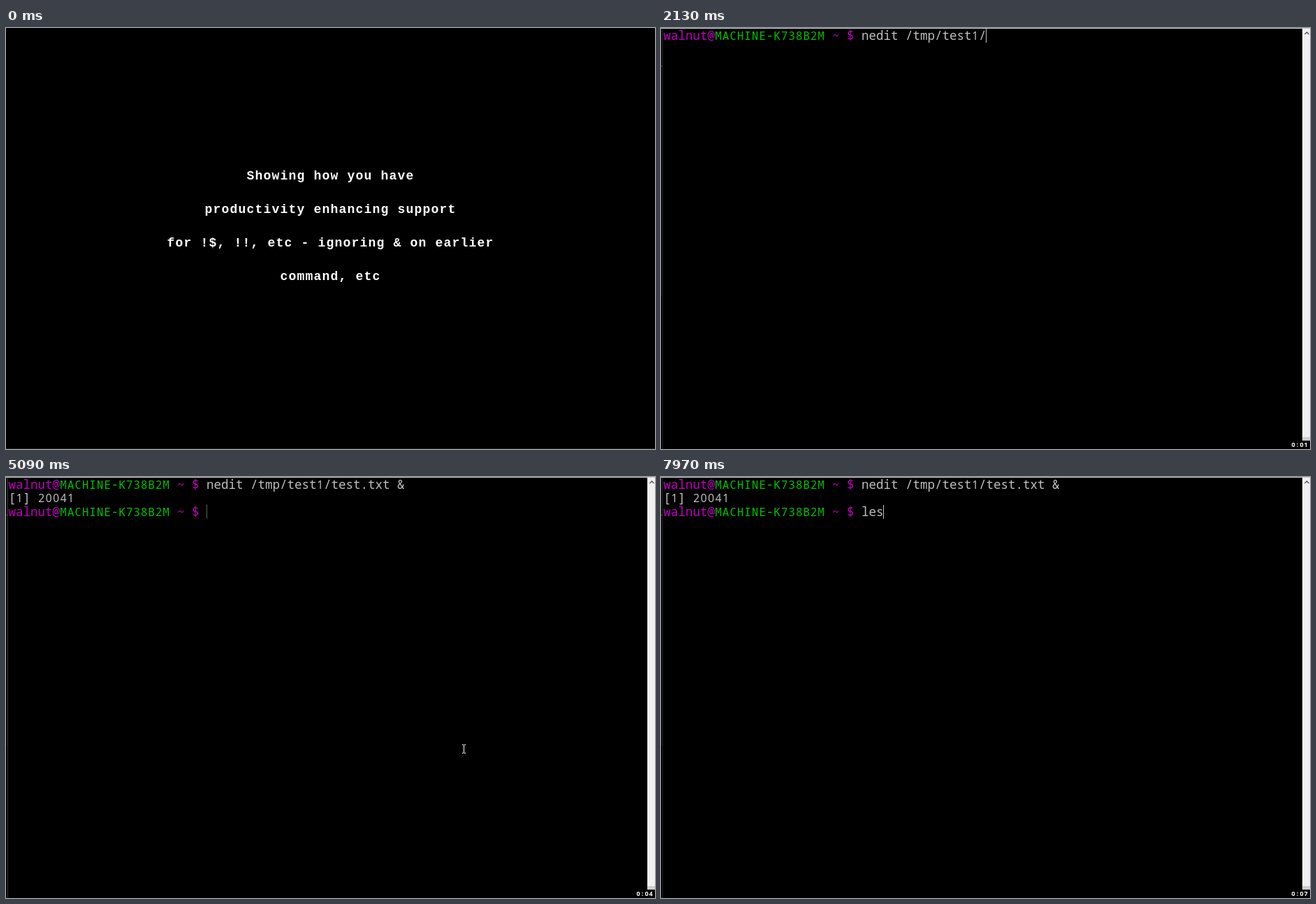
Animation, 929 px wide and 603 px high, one loop 8000 ms. Source, as an HTML page with a canvas:

```html
<!DOCTYPE html>
<html>
<head>
<meta charset="utf-8">
<style>
html, body { margin: 0; width: 100%; height: 100%; overflow: hidden; background: #000; }
canvas { display: block; }
</style>
</head>
<body>
<canvas id="stage" width="929" height="603"></canvas>
<script>
const ctx = document.getElementById('stage').getContext('2d');
const LOOP = 8000, CELL = 10.5, LEFT = 3.5;
const MAGENTA = '#bf00bf', GREEN = '#00bf00', GREY = '#bfbfbf';
const TITLE = [
  'Showing how you have',
  'productivity enhancing support',
  'for !$, !!, etc - ignoring & on earlier',
  'command, etc'
];
const USER = 'walnut@', HOST = 'MACHINE-K738B2M', PROMPT_LENGTH = 27;

// Each entry: time and the text typed at that time
const FIRST = [[500, 'nedit /t'], [620, 'm'], [770, 'p'], [890, '/'], [1040, 't'],
  [1170, 'e'], [1320, 's'], [1470, 't'], [1980, '1'], [2130, '/'],
  [2280, 'test.txt '], [3270, '&']];
const SECOND = [[7690, 'l'], [7840, 'e'], [7970, 's']];
const TICKS = [1570, 2560, 3550, 4530, 5520, 6510, 7560];
const ENTER = 3830, BLUR = 4100, FOCUS = 6080;

const within = (t, from, to) => t >= from && t < to;
const typed = (keys, t) => keys.filter(k => k[0] <= t).map(k => k[1]).join('');

function rect(x, y, w, h, color) {
  ctx.fillStyle = color;
  ctx.fillRect(x, y, w, h);
}

// Monospaced text, each glyph centred in its cell
function cells(text, x, y, step, color, fontOf) {
  ctx.fillStyle = color;
  ctx.textAlign = 'center';
  [...text].forEach((c, i) => {
    ctx.font = fontOf(c);
    ctx.fillText(c, x + (i + 0.5) * step, y);
  });
}

const titleFont = () => 'bold 18px "Liberation Mono", monospace';
const timerFont = () => 'bold 9px "Noto Sans", sans-serif';

// Low capitals and plain digits next to tall lowercase letters
function shellFont(c) {
  if (/[A-Z]/.test(c)) return '15.4px "DejaVu Sans Mono", monospace';
  if (/[0-9]/.test(c)) return '15.6px "Noto Sans", sans-serif';
  return '17.5px "Noto Sans Mono", monospace';
}

function shell(text, col, row, color) {
  cells(text, LEFT + col * CELL, 17 + Math.floor(row * 19.5), CELL, color, shellFont);
}

function promptLine(row, command) {
  shell(USER, 0, row, MAGENTA);
  shell(HOST, USER.length, row, GREEN);
  shell('~ $', 23, row, MAGENTA);
  shell(command, PROMPT_LENGTH, row, GREY);
}

function caret(col, y, dotted) {
  const x = Math.floor(LEFT + col * CELL);
  if (!dotted) return rect(x, y, 1, 20, GREY);
  for (let i = 0; i < 20; i += 2) rect(x, y + i, 1, 1, GREY);
}

function pointer(x, y) {
  for (const end of [y, y + 12]) {
    rect(x, end, 2, 1, '#fff');
    rect(x + 3, end, 2, 1, '#fff');
  }
  rect(x + 2, y + 1, 1, 11, '#fff');
}

function drawTitle() {
  TITLE.forEach((line, i) =>
    cells(line, 464 - line.length * 6, 217 + i * 48, 12, '#fff', titleFont));
  rect(0, 602, 929, 1, '#1c1c1c');
}

function drawFrame(t) {
  const blurred = within(t, BLUR, FOCUS);
  rect(0, 0, 929, 1, '#c8c8c8');
  rect(0, 1, 2, 383, '#0c0c0c');
  rect(0, 54, 2, 1, '#444');
  rect(2, 1, 1, 602, blurred ? '#333' : '#222');
  rect(918, 1, 11, 585, '#f0f0f0');
  rect(918, 586, 11, 5, '#cdcdcd');
  ctx.strokeStyle = '#505050';
  ctx.lineWidth = 1.4;
  ctx.beginPath();
  ctx.moveTo(921.5, 9);
  ctx.lineTo(924.5, 6);
  ctx.lineTo(927.5, 9);
  ctx.stroke();
  const seconds = TICKS.filter(s => s <= t).length;
  cells('0:0' + seconds, 902, 600, 6, '#fff', timerFont);
}

function drawTerminal(t) {
  drawFrame(t);
  const first = typed(FIRST, t), second = typed(SECOND, t);
  promptLine(0, first);
  if (t < ENTER) {
    if (!within(t, 2840, 3270)) caret(PROMPT_LENGTH + first.length, 1);
  } else {
    shell('[1] 20041', 0, 1, GREY);
    promptLine(2, second);
    if (!within(t, 6620, 7130))
      caret(PROMPT_LENGTH + second.length, 40, within(t, BLUR, FOCUS));
  }
  if (within(t, 4230, 5090)) pointer(506, 378);
  if (within(t, 5090, 5240)) pointer(653, 383);
  if (within(t, 6360, 6730)) pointer(503, 210);
}

function draw(now) {
  const t = now % LOOP;
  rect(0, 0, 929, 603, '#000');
  if (t < 500) drawTitle();
  else drawTerminal(t);
  requestAnimationFrame(draw);
}
requestAnimationFrame(draw);
</script>
</body>
</html>
```
